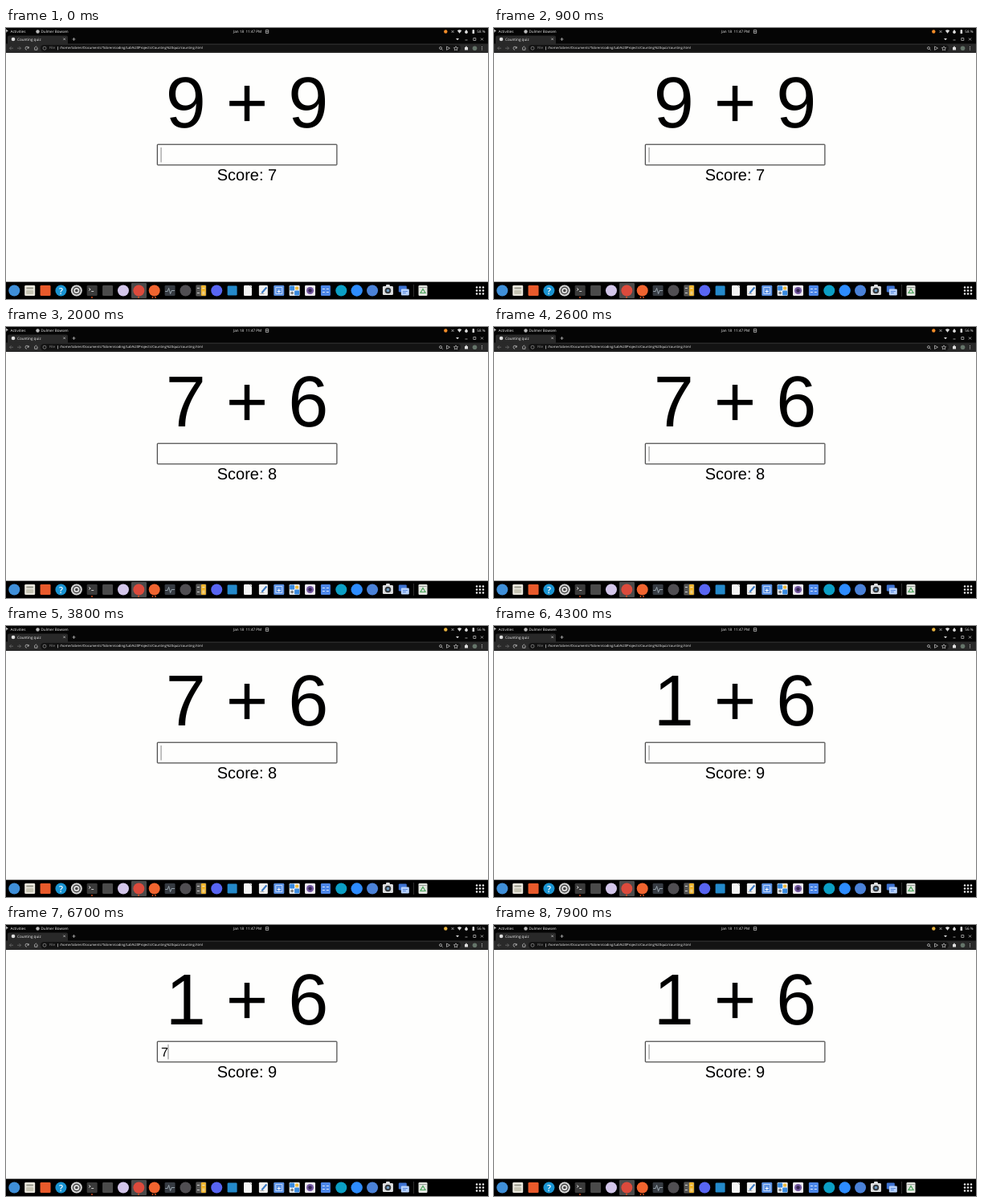
Write an HTML page that moves like this. It is 600 px wide and 338 px high and loops after 8000 ms.

```html
<!DOCTYPE html>
<html lang="en">
<head>
<meta charset="utf-8">
<title>Sums</title>
<style>
  html, body { margin: 0; width: 100%; height: 100%; overflow: hidden; background: #fefefd; }
  svg { display: block; width: 100vw; height: 100vh; }
  text { white-space: pre; text-rendering: geometricPrecision; }
  .ui { font-family: "Open Sans", "Noto Sans", sans-serif; font-size: 4.6px; fill: #f4f4f4; }
  .page { font-family: "Liberation Sans", Arial, sans-serif; fill: #000; }
  .line { fill: none; stroke: #ccc; stroke-width: .7; }
</style>
</head>
<body>
<svg viewBox="0 0 600 338">
  <rect width="600" height="338" fill="#fefefd"/>

  <!-- system bar, tabs, toolbar -->
  <rect width="600" height="31" fill="#050505"/>
  <path d="M2 20V11.500q0-2 2-2H75q2 0 2 2V20Z" fill="#292929"/>
  <rect y="19.500" width="600" height="11.300" fill="#292929"/>
  <rect x="43" y="21" width="523" height="8.400" rx="4.200" fill="#131313"/>
  <path d="M0 1.500L3 4 1.300 4.300 .5 6Z" fill="#ddd"/>
  <g class="ui">
    <text x="5.500" y="6.200">Activities</text>
    <circle cx="39.500" cy="4.500" r="2.200" fill="#bbb"/>
    <text x="43.500" y="6.200">Dulmer Bowsen</text>
    <text x="283" y="6.200">Jan 18  11:47 PM</text>
    <text id="power" x="596.500" y="6.200" text-anchor="end"></text>
    <circle cx="9" cy="14" r="2.300" fill="#ddd"/>
    <text x="14" y="15.600">Counting quiz</text>
    <text x="54" y="26.200" font-size="4.300" fill="#999">File</text>
    <text x="67" y="26.200" font-size="4.200">/home/tobren/Documents/Tobren/coding/Lab%20Projects/Counting%20quiz/counting.html</text>
  </g>
  <circle id="tray" cx="547.300" cy="4.500" r="2.200"/>
  <path d="M561.800 3.200q2.700-2 5.400 0L564.500 6.800ZM573 2l1.800 2.500a1.900 1.900 0 1 1-3.600 0ZM580.500 2.500h.7v-.6h1.200v.6h.7v4.600h-2.600Z" fill="#ddd"/>
  <path class="line" d="M323.300 2.500h3.400v4h-3.400ZM323.300 4.500h3.400M554.500 3l3 3m-3 0 3-3
    M71.300 12.500l2.600 2.600m0-2.600-2.600 2.600M82.500 14h4m-2-2v4
    M571.500 15h3M581.800 12.500h3v3h-3ZM591 12.500l3 3m0-3-3 3
    M26 27.200a2 2 0 1 1 2-2M28.200 23.200v2h-2M35 25.200l2.300-2.200 2.300 2.200M35.700 25v2.300h3.200V25
    M64.500 23.200v4.200M542.200 26.200l1.500 1.500M548.500 23l4 2.200-4 2.200Z
    M560 22.800l.8 1.700 1.800.2-1.300 1.300.4 1.900-1.700-.9-1.700.9.4-1.900-1.300-1.300 1.800-.2Z"/>
  <path class="line" style="stroke:#777" d="M9 25.200H4.500m2-2-2 2 2 2M14 25.200h4.500m-2-2 2 2-2 2"/>
  <circle class="line" cx="541" cy="25" r="1.500"/>
  <circle class="line" cx="48" cy="25.200" r="2" style="stroke:#999"/>
  <path d="M560 13l2 2.300 2-2.300ZM571 24h1.200v-1.200h1.500V24h1.300v3.500h-4Z" fill="#ddd"/>
  <circle cx="583.500" cy="25.200" r="2.800" fill="#65756a"/>
  <path d="M592.500 23v.9m0 .9v.9m0 .9v.9" stroke="#ddd" stroke-width=".9"/>

  <!-- page -->
  <g class="page" text-anchor="middle">
    <text id="sum" x="300" y="124.200" font-size="90"></text>
    <text id="score" x="300" y="190" font-size="20"></text>
  </g>
  <rect x="188.300" y="145.200" width="223.600" height="25.700" rx=".6" fill="#fefefd" stroke="#222" stroke-width="1"/>
  <text id="answer" class="page" x="193" y="164" font-size="16"></text>
  <rect id="caret" y="149" width=".9" height="18.500" fill="#777"/>

  <!-- dock -->
  <rect y="316.600" width="600" height="22" fill="#000"/>
  <rect x="156" y="318" width="19" height="19" rx="1" fill="#4a4a4a"/>
  <g id="dock"></g>
</svg>
<script>
const $ = id => document.getElementById(id);

// Dock icons are drawn around their own centre, in a box of about 14 px.
const disc = (c, r = 7) => `<circle r="${r}" fill="${c}"/>`;
const box = (c, w = 13, h = w, x = 0, y = 0) =>
  `<rect x="${x - w / 2}" y="${y - h / 2}" width="${w}" height="${h}" rx="1.3" fill="${c}"/>`;
const pen = (d, c = '#fff', w = 1) =>
  `<path d="${d}" fill="none" stroke="${c}" stroke-width="${w}"/>`;
const glyph = (s, c, size, y) =>
  `<text class="ui" text-anchor="middle" y="${y}" style="fill:${c};font-size:${size}px;font-weight:600">${s}</text>`;

const icons = [
  disc('#3f8fd8'),
  box('#e9e6dc', 13, 13) + box('#9a9a8c', 9, 2, 0, -3) + box('#c7c5b4', 9, 5, 0, 2),
  box('#e95a2b'),
  disc('#1a94d2') + glyph('?', '#fff', 11, 4),
  disc('#d8d8d8') + disc('#444', 5) + disc('#ddd', 3.6) + disc('#444', 1.8),
  box('#3a3a3a') + pen('M-4-3 -2-1.500 -4 0M-1 1H2', '#eee', .8),
  box('#4a4a4a'),
  disc('#d3c6ea'),
  disc('#dc4a3c'),
  disc('#f0642f'),
  box('#363b42') + pen('M-6 1H-3L-1.500-3 .5 4 2 0H6', '#aab8c2', .8),
  disc('#504e52'),
  box('#555', 13, 14) + box('#f0b52e', 6, 13, 3) + pen('M-5-3h3M-5 3h3M1.500-3h3M1.500 2h3M1.500 4h3', '#eee', .8),
  disc('#5865f2'),
  box('#2489ca', 12),
  box('#f4f4f4', 10, 13) + pen('M2-6.500 5-3.500', '#aaa', 1),
  box('#f1f1f1', 11, 13) + pen('M-2 3 4-4', '#3979c5', 2) + pen('M-4 4H1', '#999', .8),
  box('#5b91e3') + pen('M-4-4H4V4H-4Z', '#dbe8ff', .8) + pen('M-2 1H2M0-1V3', '#fff'),
  box('#eaf0f5') + box('#3889df', 6, 6, -3, -3) + box('#3889df', 6, 6, 3, 3) + box('#f1ba3b', 4, 4, 3, -3) + pen('M-5 3h4M-3 1v4', '#555'),
  box('#ece9f0') + disc('#72559f', 4.5) + disc('#30244e', 2.2),
  box('#4d87e8', 12, 13) + pen('M-4-2h3M1-2h3M-4 2h3M1 2h3', '#d3e4ff'),
  disc('#0b9fc5'),
  disc('#2d8cff', 7.2),
  disc('#4b82d8'),
  box('#dedfe0', 13, 11) + box('#dedfe0', 5, 3, 0, -6) + disc('#34383d', 3.8) + disc('#6d9cc4', 1.8),
  box('#3e73d2', 10, 8, -1, -2) + box('#b8d2fb', 10, 8, 2, 2) + pen('M-1 1H5M-1 3H3', '#3e73d2', .8)
];
const place = (x, art) => `<g transform="translate(${x} 327.500)">${art}</g>`;
const dots = [107, 165, 182.5, 186]
  .map(x => `<circle cx="${x}" cy="336" r=".9" fill="#e95420"/>`).join('');
const grid = [...Array(9)].map((_, i) =>
  box('#eee', 2.4, 2.4, (i % 3 - 1) * 4, (Math.floor(i / 3) - 1) * 4)).join('');
$('dock').innerHTML =
  icons.map((art, i) => place(10.3 + i * 19.38, art)).join('') + dots +
  pen('M507.500 320V335', '#444', .7) +
  place(519, box('#e2e5df', 11, 13) + pen('M-4.500-4H4.500', '#888', .8) + pen('M0-2 3 3H-3Z', '#4ba35b', 1.2)) +
  place(590, grid);

// Each step: start time, typed answer, caret shown.
const steps = [
  [0, '', 1], [300, '', 0], [900, '', 1], [1300, '1', 1], [1400, '18', 1],
  [1600, '', 1], [2000, '', 0], [2600, '', 1], [3200, '', 0], [3800, '', 1],
  [4000, '1', 1], [4100, '13', 1], [4300, '', 1], [4700, '', 0], [5300, '', 1],
  [5500, '7', 1], [6100, '7', 0], [6700, '7', 1], [6800, '', 1], [7300, '', 0], [7900, '', 1]
];
const rounds = [[0, '9 + 9'], [1600, '7 + 6'], [4300, '1 + 6']];
const put = (id, s) => { if ($(id).textContent !== s) $(id).textContent = s; };

function draw() {
  const t = performance.now() % 8000;
  const round = rounds.findLastIndex(r => r[0] <= t);
  const [, typed, caret] = steps.findLast(s => s[0] <= t);
  put('sum', rounds[round][1]);
  put('score', 'Score: ' + (7 + round));
  put('answer', typed);
  put('power', t < 2300 ? '58 %' : '56 %');
  $('tray').setAttribute('fill', t < 3800 ? '#f28c28' : '#e9b440');
  $('caret').setAttribute('x', 192.6 + typed.length * 8.9);
  $('caret').setAttribute('opacity', caret);
  requestAnimationFrame(draw);
}
draw();
</script>
</body>
</html>
```
